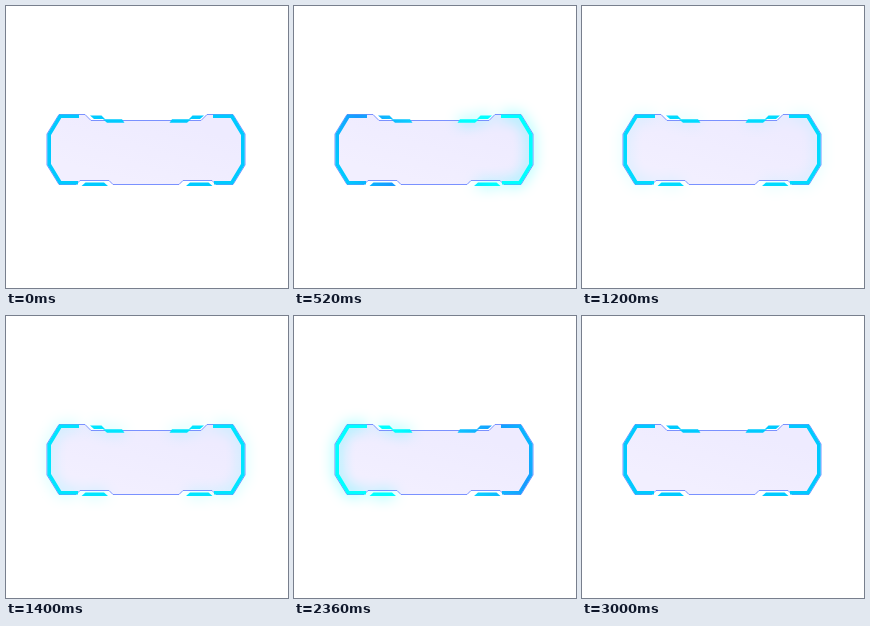
An HTML page with a canvas for the animation above (3.2 s loop, 282 by 282 pixels).

```html
<!DOCTYPE html>
<html lang="en">
<head>
<meta charset="utf-8">
<title>Sci-fi frame</title>
<style>
  html, body { margin: 0; width: 100%; height: 100%; overflow: hidden; background: #fff; }
  canvas { display: block; width: 282px; height: 282px; }
</style>
</head>
<body>
<canvas id="stage"></canvas>
<script>
const SIZE = 282, LOOP = 3200;
const BASE = [0, 202, 255], DEEP = [22, 155, 255], AQUA = [0, 255, 255];
const MID_X = 140, MID_Y = 143.5;
const BAND = 146, DEEP_AT = 0.7, TILT = 0.5;
const BAR = 3.6;

const canvas = document.getElementById('stage');
const ctx = canvas.getContext('2d');
const dpr = window.devicePixelRatio || 1;
canvas.width = canvas.height = SIZE * dpr;
ctx.scale(dpr, dpr);

// SVG path data, plus its mirror image around the given x.
function mirrored(d, axis = MID_X) {
  const both = new Path2D(d);
  both.addPath(new Path2D(d), new DOMMatrix([-1, 0, 0, 1, 2 * axis, 0]));
  return both;
}

// Horizontal bar whose ends lean by l and r pixels towards its lower edge.
const bar = (x0, x1, y, l, r) => `M${x0} ${y}H${x1}l${r} ${BAR}H${x0 + l}Z`;

const panel = mirrored('M140 178.5H107l-4 -4H74l-4 4H53L41 159V128L53 108.5H79l6 6H140');
const bracket = mirrored('M73 110.2H54.2L43.2 128.5V158.5L54.2 176.7H72');
const bars = mirrored(
  bar(84, 95.5, 109.4, 4, 3.5) + bar(97, 116, 113.2, 4, 2.5) + bar(79.5, 98, 176.4, -4, 4),
  MID_X + 1
);

const ramp = (t, from, to) => Math.min(1, Math.max(0, (t - from) / (to - from)));
const smooth = k => (1 - Math.cos(Math.PI * k)) / 2;
const mix = (a, b, k) => a.map((v, i) => v + (b[i] - v) * k);
const css = (c, a = 1) => `rgba(${c.map(Math.round).join(',')},${a})`;

// Slanted gradient over the colour band that begins at x.
function band(x, stops) {
  const scale = 1 / (1 + TILT * TILT);
  const at = v => [MID_X + (v - MID_X) * scale, MID_Y - TILT * (v - MID_X) * scale];
  const g = ctx.createLinearGradient(...at(x), ...at(x + BAND));
  stops.forEach(([k, color]) => g.addColorStop(k, color));
  return g;
}

function paintLights(style) {
  ctx.fillStyle = ctx.strokeStyle = style;
  ctx.lineWidth = BAR;
  ctx.stroke(bracket);
  ctx.fill(bars);
}

function draw(t) {
  const off = t >= 2000;
  const x = off
    ? 248 - 362 * ramp(t, 2000, 3000)
    : 248 - 204 * ramp(t, 20, 360) - 158 * ramp(t, 500, 920);
  const dip = smooth(ramp(t, 1010, 1320)) - smooth(ramp(t, 1320, 1480));
  const place = k => off ? k : 1 - k;
  const tone = c => css(mix(c, BASE, dip));

  ctx.clearRect(0, 0, SIZE, SIZE);

  const fill = ctx.createLinearGradient(150, 110, 130, 178);
  fill.addColorStop(0, '#eeebff');
  fill.addColorStop(1, '#f2efff');
  ctx.fillStyle = fill;
  ctx.fill(panel);

  ctx.filter = `blur(${7 * dpr}px)`;
  paintLights(band(x, [
    [place(0), css(AQUA, 0.8 * (1 - dip))],
    [place(DEEP_AT / 2), css(AQUA, 0)]
  ]));
  ctx.filter = 'none';

  ctx.lineWidth = 0.9;
  ctx.strokeStyle = '#6c86ff';
  ctx.stroke(panel);

  paintLights(band(x, [
    [place(0), tone(AQUA)], [place(DEEP_AT), tone(DEEP)], [place(1), tone(BASE)]
  ]));
}

const start = performance.now();
function tick() {
  draw((performance.now() - start) % LOOP);
  requestAnimationFrame(tick);
}
tick();
</script>
</body>
</html>
```
